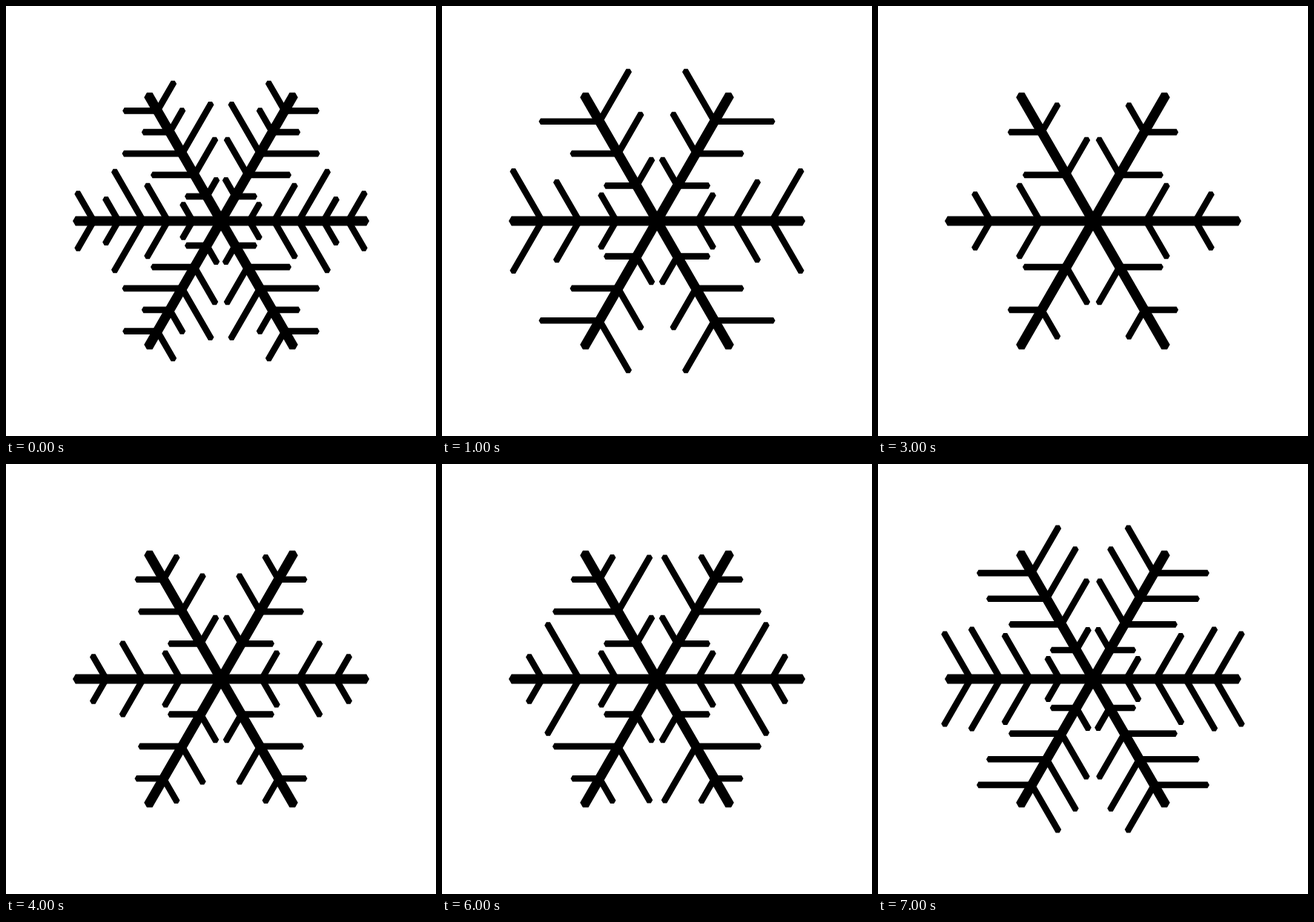
Animation, 580 px wide and 580 px high, one loop 8000 ms. Source, as an HTML page with a canvas:

```html
<!DOCTYPE html>
<html lang="en">
<head>
<meta charset="utf-8">
<title>Snowflakes</title>
<style>
  html, body { margin: 0; width: 100%; height: 100%; overflow: hidden; background: #fff; }
  canvas { display: block; }
</style>
</head>
<body>
<canvas id="stage" width="580" height="580"></canvas>
<script>
const ctx = document.getElementById('stage').getContext('2d');
const STEP = 1000, REACH = 200, SIXTH = Math.PI / 3;
const ARM_R = 7.5, TWIG_R = 5;

// Twig pairs per arm, then the free twig lengths from the tip inwards.
// Twigs left out grow until they nearly touch the neighbouring arm's.
const flakes = [
  [5, 42, 33, 76],
  [3, 77, 60],
  [4, 43.5, 35, 44],
  [2, 41],
  [3, 34, 54.5],
  [5, 60, 78, 69.5],
  [3, 34],
  [4, 69.5, 76.5, 66.5]
];

const longestTwig = place => 0.88 * place - 4.5;

// A bar along the x axis with half-hexagon ends.
function bar(length, r) {
  const h = r * Math.sqrt(3) / 2;
  ctx.beginPath();
  ctx.moveTo(-r, 0);
  ctx.lineTo(-r / 2, -h);
  ctx.lineTo(length + r / 2, -h);
  ctx.lineTo(length + r, 0);
  ctx.lineTo(length + r / 2, h);
  ctx.lineTo(-r / 2, h);
  ctx.fill();
}

function drawArm([count, ...lengths]) {
  bar(REACH - ARM_R, ARM_R);
  for (let i = 0; i < count; i++) {
    const place = REACH * (count - i) / (count + 1);
    for (const side of [-1, 1]) {
      ctx.save();
      ctx.translate(place + TWIG_R, 0);
      ctx.rotate(side * SIXTH);
      bar(lengths[i] ?? longestTwig(place), TWIG_R);
      ctx.restore();
    }
  }
}

function drawFlake(flake) {
  ctx.fillStyle = '#fff';
  ctx.fillRect(0, 0, 580, 580);
  ctx.fillStyle = '#000';
  ctx.save();
  ctx.translate(290, 290);
  for (let i = 0; i < 6; i++) {
    drawArm(flake);
    ctx.rotate(SIXTH);
  }
  ctx.restore();
}

const start = performance.now();
function frame() {
  const step = Math.floor((performance.now() - start) / STEP);
  drawFlake(flakes[step % flakes.length]);
  requestAnimationFrame(frame);
}
frame();
</script>
</body>
</html>
```
